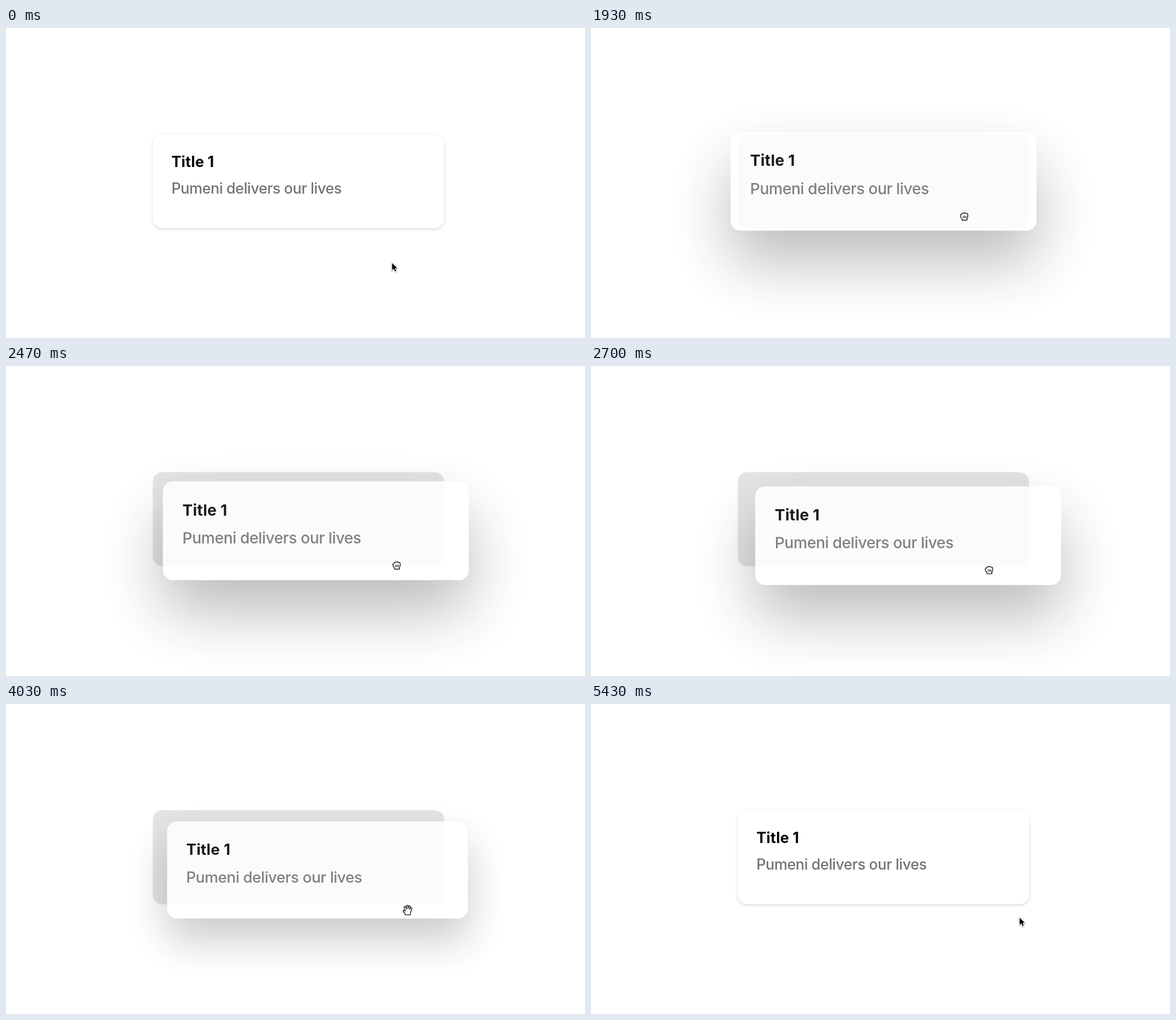
These frames come from a looping animation (980x524 px, 5460 ms). An HTML page:

```html
<!DOCTYPE html>
<html lang="en">
<head>
<meta charset="utf-8">
<title>Drag a card</title>
<style>
  html, body { margin: 0; width: 100%; height: 100%; overflow: hidden; background: #fff; }
  .box {
    position: absolute; left: 0; top: 0; width: 493px; height: 159px; border-radius: 16px;
    font-family: Inter, "Open Sans", sans-serif; font-optical-sizing: none;
  }
  #slot { background: #e4e4e7; transform: translate(248.5px, 179.5px); }
  #card { background: #fff; }
  p { position: absolute; left: 31.4px; margin: 0; font-size: 25px; line-height: 40px; white-space: nowrap; }
  .title { top: 25.8px; font-weight: 700; color: #000; letter-spacing: .2px; }
  .text { top: 70.6px; font-weight: 450; color: #737375; letter-spacing: -.4px; }
  svg { position: absolute; left: 0; top: 0; width: 100%; height: 100%; }
  #arrow { stroke: #fff; stroke-width: 2; paint-order: stroke; filter: drop-shadow(0 1.5px 1px #0006); }
  .hand { fill: #fff; stroke: #000; stroke-width: 1.2; stroke-linejoin: round; stroke-linecap: round; }
</style>
</head>
<body>
<div id="slot" class="box"></div>
<div id="card" class="box">
  <p class="title">Title 1</p>
  <p class="text">Pumeni delivers our lives</p>
</div>
<svg>
  <g id="cursor">
    <path id="arrow" transform="translate(.5 .8) scale(.93)" d="M0 .5V13.5L3.1 10.6 5.3 15.6 7.4 14.7 5.3 9.8H9.3Z"/>
    <g id="open" class="hand" transform="translate(1 3)">
      <path d="M-3.5 7.5q-1-2.5-4-5.5q-1-1.8.5-2.4q1.4-.2 2.7 1.6l-1.8-6q-.4-1.7 1-2q1.3-.2 1.8 1.4l.9 3v-5q.1-1.6 1.4-1.6t1.4 1.6v4.6l1-4q.4-1.5 1.7-1.2t1 1.8l-.9 4.3 1.3-2.3q.9-1.2 1.9-.5t.4 2.2q-1.6 3.6-2 6.5q-.4 2-1 3.5z"/>
    </g>
    <g id="closed" class="hand" transform="translate(1 3)">
      <path d="M-4.6-3.4q.6-2.4 2.6-2q.8-1.4 2.4-.2q1.6-1 2.6.5q2.9-.7 3.1 1.9v2.5q-.1 2.4-1.4 4.2v2.7h-8.2v-2.2q-2.9-2.7-3.1-5q-.1-1.9 2-2.4z"/>
      <path d="M-1.5-.8v3.2M.8-.8v3.2M3.1-.8v3.2" stroke-width="1"/>
    </g>
  </g>
</svg>
<script>
const LOOP = 5460, PICK = 825, DROP = 3985, END = 4200;
const $ = id => document.getElementById(id);
const mix = (a, b, k) => a + (b - a) * k;
const part = (t, a, b) => Math.min(1, Math.max(0, (t - a) / (b - a)));
const smooth = x => x * x * (3 - 2 * x);

// CSS "ease": cubic-bezier(.25, .1, .25, 1)
function ease(x) {
  const bez = (a, b, s) => 3 * a * s * (1 - s) ** 2 + 3 * b * s * s * (1 - s) + s ** 3;
  let lo = 0, hi = 1;
  for (let i = 0; i < 20; i++) {
    const mid = (lo + hi) / 2;
    if (bez(.25, .25, mid) < x) lo = mid; else hi = mid;
  }
  return bez(.1, 1, lo);
}

function drawCard(t, drag) {
  const held = t >= PICK && t < END;
  const back = ease(part(t, DROP, END));
  const lift = held ? ease(part(t, PICK, 1030)) * (1 - back) : 0;
  const move = held ? drag * (1 - back) : 0;
  const x = 248.5 + 48 * move, y = 179.5 + 32 * move;
  const card = $("card").style;
  $("slot").style.display = held ? "" : "none";
  card.opacity = held ? .88 : 1;
  card.transform = `translate(${x}px, ${y}px) scale(${mix(1, 1.05, lift)})`;
  card.boxShadow =
    `0 0 0 1px rgba(0,0,0,${mix(held ? .09 : .015, 0, lift)}),` +
    `0 ${mix(2, 50, lift)}px ${mix(6, 100, lift)}px rgba(0,0,0,${mix(.1, .31, lift)}),` +
    `0 2px 4px -2px rgba(0,0,0,${mix(.1, 0, lift)})`;
}

function drawCursor(t, drag) {
  const enter = smooth(part(t, 15, 270));
  let x = mix(653, 630.5, enter) + 48.5 * drag;
  let y = mix(396, 315.5, enter) + 30.5 * drag;
  if (t >= 5430) { x = 725; y = 360; }
  const shape = y > 338 && t < PICK || t >= 4100 ? "arrow"
    : t >= PICK && t < DROP ? "closed" : "open";
  for (const id of ["arrow", "open", "closed"])
    $(id).style.display = id === shape ? "" : "none";
  $("cursor").setAttribute("transform", `translate(${x} ${y})`);
}

function frame(now) {
  const t = now % LOOP;
  const drag = smooth(part(t, 1910, 2970) ** .87);
  drawCard(t, drag);
  drawCursor(t, drag);
  requestAnimationFrame(frame);
}
frame(0);
</script>
</body>
</html>
```
